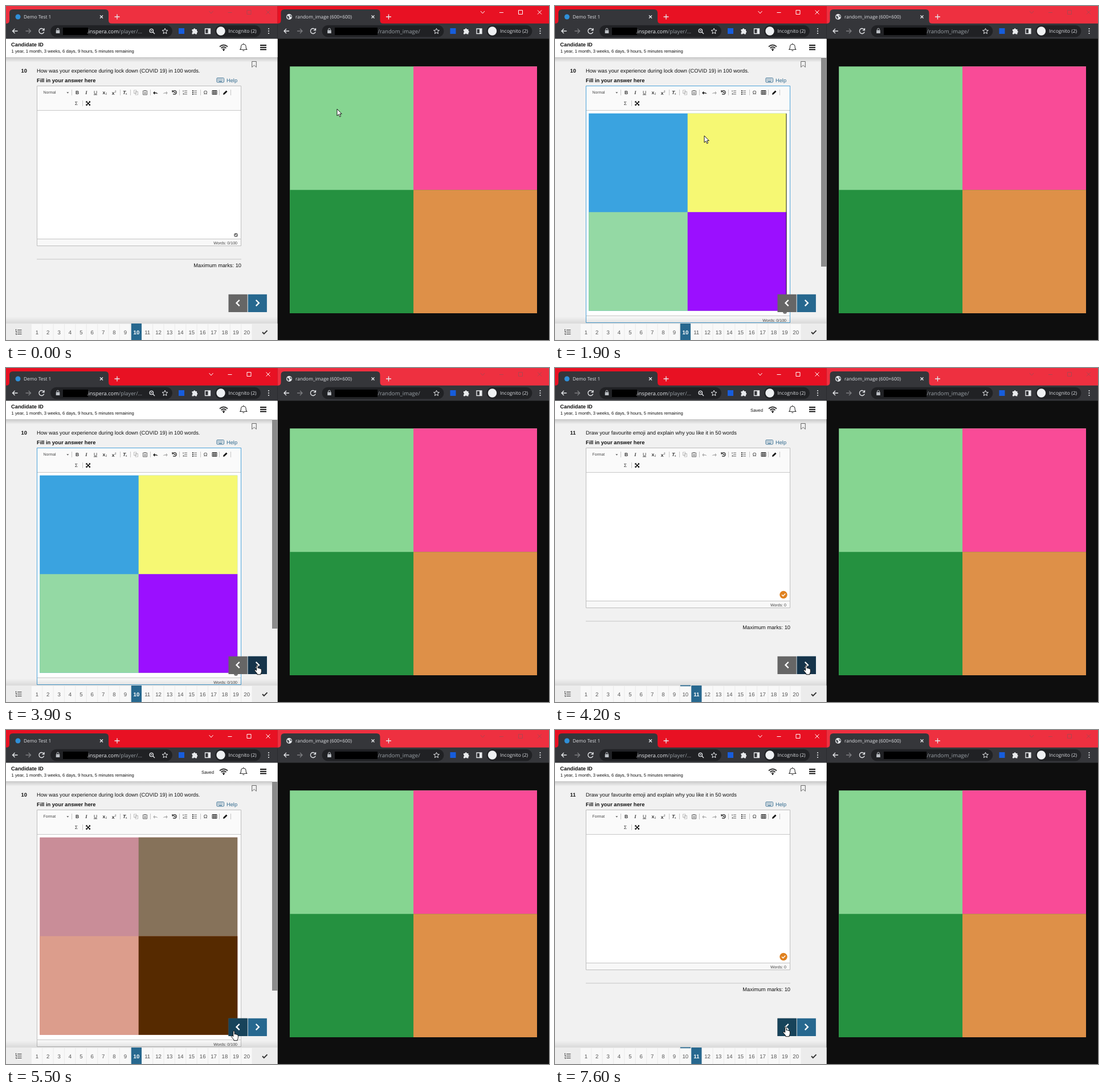
These frames come from a looping animation (953x587 px, 8 s). An HTML page:

```html
<!DOCTYPE html>
<html lang="en">
<head>
<meta charset="utf-8">
<title>Drag and drop between two windows</title>
<style>
html, body { margin: 0; width: 100%; height: 100%; overflow: hidden; background: #0e0e0e; }
svg { display: block; width: 953px; height: 587px; font-family: "Liberation Sans", Arial, sans-serif; font-size: 9.26px; fill: #111; text-rendering: geometricPrecision; }
.ui { font-family: "Open Sans", "Noto Sans", sans-serif; font-size: 8.35px; fill: #dfe1e5; }
.url { font-size: 9.3px; fill: #9aa0a6; }
.b { font-weight: bold; }
.s { font-size: 7.05px; fill: #444; }
.line { fill: none; stroke: #333; stroke-width: 1.1; }
.light { stroke: #e8eaed; stroke-width: 1.3; }
.thin { stroke: #555; stroke-width: .9; }
.dim { opacity: .32; }
.mid { text-anchor: middle; }

.t { visibility: hidden; animation: 8s step-end infinite; }
.swap { animation-name: swap; }
.start { animation-name: start; }
.first { animation-name: first; }
.early { animation-name: early; }
.late { animation-name: late; }
.p10 { animation-name: p10; }
.p11 { animation-name: p11; }
.short { animation-name: short; }
.tall { animation-name: tall; }
.second { animation-name: second; }
.saved { animation-name: saved; }
.drag { animation-name: drag; }
.blink { animation-name: blink; }
.next { animation-name: next; }
.prev { animation-name: prev; }
.hand { animation-name: hand; }
.arrow { animation-name: arrow; }
@keyframes swap { 0% { visibility: hidden } 22.5%, to { visibility: visible } }
@keyframes start { 0% { visibility: visible } 22.5%, to { visibility: hidden } }
@keyframes first { 0%, 50%, to { visibility: hidden } 22.5% { visibility: visible } }
@keyframes early { 0% { visibility: visible } 50%, to { visibility: hidden } }
@keyframes late { 0% { visibility: hidden } 50%, to { visibility: visible } }
@keyframes p10 { 0%, 66.25% { visibility: visible } 50%, 86.25%, to { visibility: hidden } }
@keyframes p11 { 0%, 66.25% { visibility: hidden } 50%, 86.25%, to { visibility: visible } }
@keyframes short { 0%, 50%, 86.25%, to { visibility: visible } 22.5%, 66.25% { visibility: hidden } }
@keyframes tall { 0%, 50%, 86.25%, to { visibility: hidden } 22.5%, 66.25% { visibility: visible } }
@keyframes second { 0%, 86.25%, to { visibility: hidden } 66.25% { visibility: visible } }
@keyframes saved { 0%, 72.5%, to { visibility: hidden } 52.5% { visibility: visible } }
@keyframes drag { 0%, 22.5%, to { visibility: hidden } 6.5% { visibility: visible } }
@keyframes blink { 0%, 29.12%, 42.37%, 50%, to { visibility: hidden } 22.5%, 35.75%, 49% { visibility: visible } }
@keyframes next { 0%, 56.6%, 91.8%, to { visibility: hidden } 37.25%, 74.5% { visibility: visible } }
@keyframes prev { 0%, 61.9%, 74.5% { visibility: hidden } 56.6%, 63.25%, 91.8%, to { visibility: visible } }
@keyframes hand { 0%, 61.9% { visibility: hidden } 37.25%, 63.25%, to { visibility: visible } }
@keyframes arrow { 0%, 61.9% { visibility: visible } 37.25%, 63.25%, to { visibility: hidden } }

.pointer { animation: move 8s ease-in-out infinite; }
@keyframes move {
  0%, 1.25% { transform: translate(581px, 181px) }
  11.25%, 28.75% { transform: translate(262px, 228px) }
  38.75%, 52.5% { transform: translate(441px, 522px) }
  62.5% { transform: translate(390px, 531px) }
  65%, 72.5% { transform: translate(400px, 529px) }
  76.25%, 90% { transform: translate(441px, 523px) }
  93.75%, to { transform: translate(405px, 522px) }
}
</style>
</head>
<body>
<svg viewBox="0 0 953 587">
<defs>
  <linearGradient id="fade" x2="0" y2="1"><stop stop-color="#000" stop-opacity=".17"/><stop offset="1" stop-color="#000" stop-opacity="0"/></linearGradient>
  <linearGradient id="rise" x2="0" y2="1"><stop stop-color="#000" stop-opacity="0"/><stop offset="1" stop-color="#000" stop-opacity=".1"/></linearGradient>
  <g id="bar">
    <path d="M0 0h476.5v32H0z" style="fill:var(--bg)"/>
    <path d="M356.500 9l3.500 4 3.500-4M389.500 11.500h7M423 7.500h7v7h-7zM456.500 7.500l7 7m0-7l-7 7" style="fill:none;stroke:var(--fg)"/>
  </g>
  <g id="chrome">
    <path d="M0 30.700h476.500v27.100H0z" fill="#35363a"/>
    <path d="M0 31q6 0 6-6v-13q0-6 6-6h162q6 0 6 6v13q0 6 6 6z" fill="#35363a"/>
    <path class="line light" d="M165 16.500l5 5m0-5l-5 5M195 14.500v9m-4.500-4.500h9"/>
    <path class="line light" d="M20.500 44h-9m4-4l-4 4 4 4M66.500 42a4.500 4.500 0 1 0 .2 3.500M67 39v3.600h-3.600"/>
    <path class="line light" opacity=".4" d="M34.500 44h9m-4-4l4 4-4 4"/>
    <rect x="78" y="33.700" width="214" height="20.800" rx="10.400" fill="#202124"/>
    <path d="M87.700 42.500h6.600v5.500h-6.600z" fill="#bdc1c6"/>
    <path d="M89.200 42.500v-1.500a1.800 1.800 0 0 1 3.600 0v1.500" fill="none" stroke="#bdc1c6"/>
    <path class="line light" d="M279 39.300l1.400 3.200 3.500.3-2.700 2.300.8 3.500-3-1.900-3 1.900.8-3.500-2.700-2.300 3.500-.3z" style="stroke-width:1"/>
    <rect x="303" y="39" width="10" height="10" fill="#175ddc"/>
    <path d="M326.500 41h2.500a1.700 1.700 0 0 1 3.400 0h2.600v2.700a1.700 1.700 0 0 1 0 3.300v2.500h-2.800a1.600 1.600 0 0 0-3 0h-2.700v-2.800a1.600 1.600 0 0 0 0-3z" fill="#e8eaed"/>
    <path class="line light" d="M349.500 40h9v8.500h-9z"/><path d="M354.500 40h4v8.500h-4z" fill="#e8eaed"/>
    <rect x="367" y="33.700" width="80" height="20.800" rx="10.400" fill="#202124"/>
    <circle cx="377" cy="44" r="7.700" fill="#eef0f2"/>
    <text class="ui" x="390.500" y="47" style="font-size:8.500px">Incognito (2)</text>
    <g fill="#e8eaed"><circle cx="461" cy="40" r="1.100"/><circle cx="461" cy="44" r="1.100"/><circle cx="461" cy="48" r="1.100"/></g>
  </g>
  <g id="quad">
    <path d="M0 0h1v1H0z" style="fill:var(--a)"/>
    <path d="M.5 0H1v1H.5z" style="fill:var(--b)"/>
    <path d="M0 .5h1V1H0z" style="fill:var(--c)"/>
    <path d="M.5 .5H1V1H.5z" style="fill:var(--d)"/>
  </g>
  <path id="undo" d="M3.500 2.500q-1-3-5.500-2.500v-2.300l-2.800 3 2.800 3v-2.200q3.500-.4 5.500 1z"/>
  <path id="list" class="line thin" d="M-1-3h5M-1 0h5M-1 3h5"/>
</defs>

<!-- window frames -->
<use href="#bar" style="--bg:#ee3040;--fg:#b0444e"/>
<use href="#bar" x="476.500" style="--bg:#ee3040;--fg:#b0444e"/>
<g class="t swap"><use href="#bar" style="--bg:#e81123;--fg:#fff"/></g>
<g class="t start"><use href="#bar" x="476.500" style="--bg:#e81123;--fg:#fff"/></g>
<use href="#chrome"/>
<use href="#chrome" x="476.500"/>
<circle cx="21" cy="19" r="4.500" fill="#2f8fd8"/>
<text class="ui" x="31" y="22">Demo Test 1</text>
<path d="M100 38h44v13h-44zM577 38h75v13h-75z" fill="#000"/>
<text class="ui url" x="142" y="47.500"><tspan fill="#e8eaed">.inspera.com</tspan>/player/...</text>
<path class="line light" d="M258 46l3 3M258.500 43.500a3.200 3.200 0 1 0-6.400 0a3.200 3.200 0 1 0 6.400 0M254 43.500h2.600"/>
<circle cx="497" cy="19" r="5" fill="#e8eaed"/>
<path d="M493 17q3 0 4 2t-1 4q-3-2-3-6zM498 14.500q0 2 3 2.500l0 3q-2-1-3-3z" fill="#50545a"/>
<text class="ui" x="508" y="22">random_image (600×600)</text>
<text class="ui url" x="652.500" y="47.500" style="font-size:9.600px">/random_image/</text>

<!-- right page -->
<path d="M476.500 57.800H953V587H476.500z" fill="#0e0e0e"/>
<use href="#quad" transform="translate(498.200 106.300) scale(433.800)" style="--a:#86d591;--b:#f94b97;--c:#259140;--d:#de9048"/>

<!-- left page -->
<path d="M0 57.800h476.500V587H0z" fill="#f1f1f1"/>
<path d="M0 57.800h476.500V90H0z" fill="#fff"/>
<path d="M0 90h476.500v9H0z" fill="url(#fade)"/>
<text class="b" x="9" y="71" style="font-size:9.300px">Candidate ID</text>
<text x="9.500" y="81.500" style="font-size:7.680px">1 year, 1 month, 3 weeks, 6 days, 9 hours, 5 minutes remaining</text>
<text class="t saved" x="343" y="76.500" style="font-size:7.760px">Saved</text>
<path class="line" d="M375 71.500q7-6 14 0M377.500 74q4.500-4 9 0M379.800 76.200q2.200-1.800 4.400 0" style="stroke-width:1.700"/>
<circle cx="382" cy="77.800" r="1.300"/>
<path class="line" d="M411 76.500q1.500-1.500 1.500-5a4.300 4.300 0 0 1 8.600 0q0 3.500 1.500 5zM415.300 78.500h3M416.800 67v-1.500"/>
<path class="line" d="M446 69h11M446 72.800h11M446 76.600h11" style="stroke:#111;stroke-width:2"/>
<path class="line thin" d="M431.700 97.500h7.600v10l-3.800-3.300-3.800 3.300z"/>

<g class="t p10"><text class="b" x="26.500" y="117">10</text><text x="54" y="117">How was your experience during lock down (COVID 19) in 100 words.</text></g>
<g class="t p11"><text class="b" x="26.500" y="117">11</text><text x="54" y="117">Draw your favourite emoji and explain why you like it in 50 words</text></g>
<text class="b" x="54" y="134">Fill in your answer here</text>
<g stroke="#3a7194" fill="none"><rect x="370" y="126.500" width="12.500" height="7.500" rx="1"/><path d="M371.500 128.800h9.500M371.500 130.800h9.500" stroke-dasharray="1.200 .7"/><path d="M373.500 132.600h5.500"/></g>
<text x="387" y="133.500" style="fill:#2d678c">Help</text>

<g class="t short">
  <path d="M54.500 140.500h358v281h-358z" fill="#fff" stroke="#bdbdbd"/>
  <path d="M55 409.500h357v11.500H55z" fill="#f8f8f8"/>
  <path d="M54.500 409.500h358M54 445h359" stroke="#c4c4c4"/>
  <text x="413" y="458.500" text-anchor="end" style="font-size:9.300px">Maximum marks: 10</text>
</g>
<g class="t tall">
  <path d="M467 90h9.500v468H467z" fill="#f1f1f1"/><path d="M467 91h9.500v367H467z" fill="#8b8b8b"/>
  <path d="M54.500 140.500h358v416h-358z" fill="#fff" stroke="#bdbdbd"/>
  <path d="M55 544.500h357v11.500H55z" fill="#f8f8f8"/>
  <path d="M54.500 544.500h358" stroke="#c4c4c4"/>
  <text class="s" x="406" y="554.500" text-anchor="end">Words: 0/100</text>
  <circle cx="403.500" cy="537.500" r="3.500" fill="#777"/>
</g>
<path d="M55 141h357v42H55z" fill="#fafafa"/>
<path d="M55 183.500h357" stroke="#c8c8c8"/>
<path class="t first" d="M54.500 140.500h358v416h-358z" fill="none" stroke="#4ba3d9"/>

<!-- editor tools -->
<text class="s t early" x="65.500" y="154" style="font-size:6.850px">Normal</text>
<text class="s t late" x="65.500" y="154" style="font-size:6.850px">Format</text>
<path d="M106.300 151.500h4l-2 2z" fill="#444"/>
<path d="M115.500 147v10M200.500 147v10M218.500 147v10M253.500 147v10M304.500 147v10M341.500 147v10M374.500 147v10M394.500 147v10M134.500 166v10" stroke="#c6c6c6"/>
<g class="mid" fill="#333" style="font-size:8.500px">
  <text class="b" x="125" y="155">B</text>
  <text class="b" x="141" y="155" font-style="italic" font-family="Liberation Serif, serif">I</text>
  <text x="157" y="154.500" text-decoration="underline">U</text>
  <text class="b" x="171.800" y="154.500">x</text><text x="176" y="156" style="font-size:5px">2</text>
  <text class="b" x="188" y="155.500">x</text><text x="192.200" y="152" style="font-size:5px">2</text>
  <text class="b" x="207.500" y="155" font-style="italic">T</text><text x="211" y="156" style="font-size:5.500px">x</text>
  <text x="350" y="155" style="font-size:9px">Ω</text><text x="123.500" y="174">Σ</text>
</g>
<path class="line dim" d="M224.500 148h4.500v5.500h-4.500zM227 150.500h4.500v5.500h-4.500z" style="stroke-width:.9"/>
<path class="line thin" d="M240.500 149h7v7h-7zM242.500 148.500h3M242 152h4M242 154h4"/>
<g class="t early"><use href="#undo" x="263" y="152"/></g>
<g class="t late"><use class="dim" href="#undo" x="263" y="152"/></g>
<use class="dim" href="#undo" transform="translate(279 152) scale(-1 1)"/>
<path class="line" d="M293 150a3.400 3.400 0 1 1 .2 4.200M292 148v2.800h2.800M296 150.500v2h1.700" style="stroke-width:1.300"/>
<use href="#list" x="314" y="152"/><use href="#list" x="331" y="152"/>
<path class="line thin" d="M311 148v3M310.500 153.500h1.500v2h-1.500"/>
<path d="M327 148h2v2h-2zM327 151h2v2h-2zM327 154h2v2h-2z" fill="#444"/>
<path class="line" d="M362 148.500h8v7h-8zM362 149.200h8M362 151.700h8M362 153.700h8M364.700 149v6.500M367.300 149v6.500" style="stroke-width:.9"/>
<path d="M381 156l.7-2.800 4.800-4.800 2 2-4.800 4.800z"/>
<path class="line" d="M141.500 168.500l5.500 5.500m0-5.500l-5.500 5.500" style="stroke:#000;stroke-width:1.400"/>
<path d="M140.300 167.300h3l-3 3zM148 167.300v3l-3-3zM140.300 175v-3l3 3zM148 175h-3l3-3z"/>

<!-- editor content -->
<g class="t start">
  <circle cx="403.500" cy="402.500" r="3.500" fill="#777"/><path class="line" d="M401.800 402.500l1.300 1.300 2.200-2.500" style="stroke:#fff"/>
  <text class="s" x="406" y="418.500" text-anchor="end">Words: 0/100</text>
</g>
<g class="t p11">
  <circle cx="401" cy="398.500" r="6.700" fill="#e0811f"/><path class="line" d="M398 398.500l2.300 2.300 4-4.300" style="stroke:#fff;stroke-width:1.400"/>
  <text class="s" x="406" y="418.500" text-anchor="end">Words: 0</text>
</g>
<path class="t drag" d="M59.500 188.500v11" stroke="#000"/>
<g class="t first"><use href="#quad" transform="translate(59.200 188.700) scale(347)" style="--a:#3aa3e0;--b:#f6f873;--c:#94d9a4;--d:#9b0fff"/></g>
<g class="t second"><use href="#quad" transform="translate(59.200 188.700) scale(347)" style="--a:#c98d98;--b:#86725a;--c:#dc9d8c;--d:#562a00"/></g>
<path class="t blink" d="M406 189v346.500" stroke="#222"/>

<!-- page navigation -->
<path d="M0 546h476.500v12H0z" fill="url(#rise)"/>
<path d="M0 558h476.500v29H0z" fill="#ececec"/>
<g id="cells" class="mid"></g>
<g class="t p10"><path d="M219.800 558h18.200v29h-18.200z" fill="#27688f"/><text class="b mid" x="228.900" y="577" fill="#fff" style="font-size:9.600px">10</text></g>
<g class="t p11"><path d="M219.800 557.500h18.200v1.800h-18.200zM239.200 558h18.200v29h-18.200z" fill="#27688f"/><text class="b mid" x="248.300" y="577" fill="#fff" style="font-size:9.600px">11</text></g>
<path class="line" d="M20 569.500h7.500M20 573h7.500M20 576.500h7.500M17.500 568v2.500M16.800 572h1.400v2M16.800 576h1.400v2"/>
<path class="line" d="M450 573.300l2.800 2.800 5.700-5.700" style="stroke-width:2"/>
<path d="M390.500 506.700h33.200v31.200h-33.200z" fill="#666"/>
<path d="M424.700 506.700h33.200v31.200h-33.200z" fill="#27688f"/>
<path class="t prev" d="M390.500 506.700h33.200v31.200h-33.200z" fill="#17435a"/>
<path class="t next" d="M424.700 506.700h33.200v31.200h-33.200z" fill="#16344a"/>
<path class="line" d="M409.700 516.700l-5.200 5.200 5.200 5.200M438.700 516.700l5.200 5.200-5.200 5.200" style="stroke:#fff;stroke-width:2.300"/>

<g class="pointer">
  <path class="t arrow" d="M0 0v12l2.800-2.600 1.900 4.300 1.900-.9-1.900-4.100h3.600z" fill="#fff" stroke="#000" stroke-width=".9"/>
  <g class="t drag"><path d="M6.700 13.500h8v8h-8z" fill="#fff" stroke="#000"/><path d="M10.700 15.500v4m-2-2h4" stroke="#000"/></g>
  <path class="t hand" d="M-1.300 9.500V1q0-1.200 1.200-1.200T1.100 1v4.500q2-.8 2.400.6 1.800-.6 2.200.7 1.700-.3 1.700 1.300v3.400q0 2-1.200 3.300v1.900h-6.400v-1.500l-4.400-5.400q-.5-1.500 1-1.600z" fill="#fff" stroke="#000" stroke-width=".9"/>
</g>
</svg>
<script>
const pitch = 19.39;
let cells = '';
for (let n = 1; n <= 20; n++) {
  const x = 54 + pitch * (n - 1);
  cells += `<rect x="${x - 9.1}" y="559" width="18.2" height="28" fill="#f8f8f8"/>` +
    `<text x="${x + .3}" y="577" fill="#555" style="font-size:9.6px">${n}</text>`;
}
document.getElementById('cells').innerHTML = cells;
</script>
</body>
</html>
```
